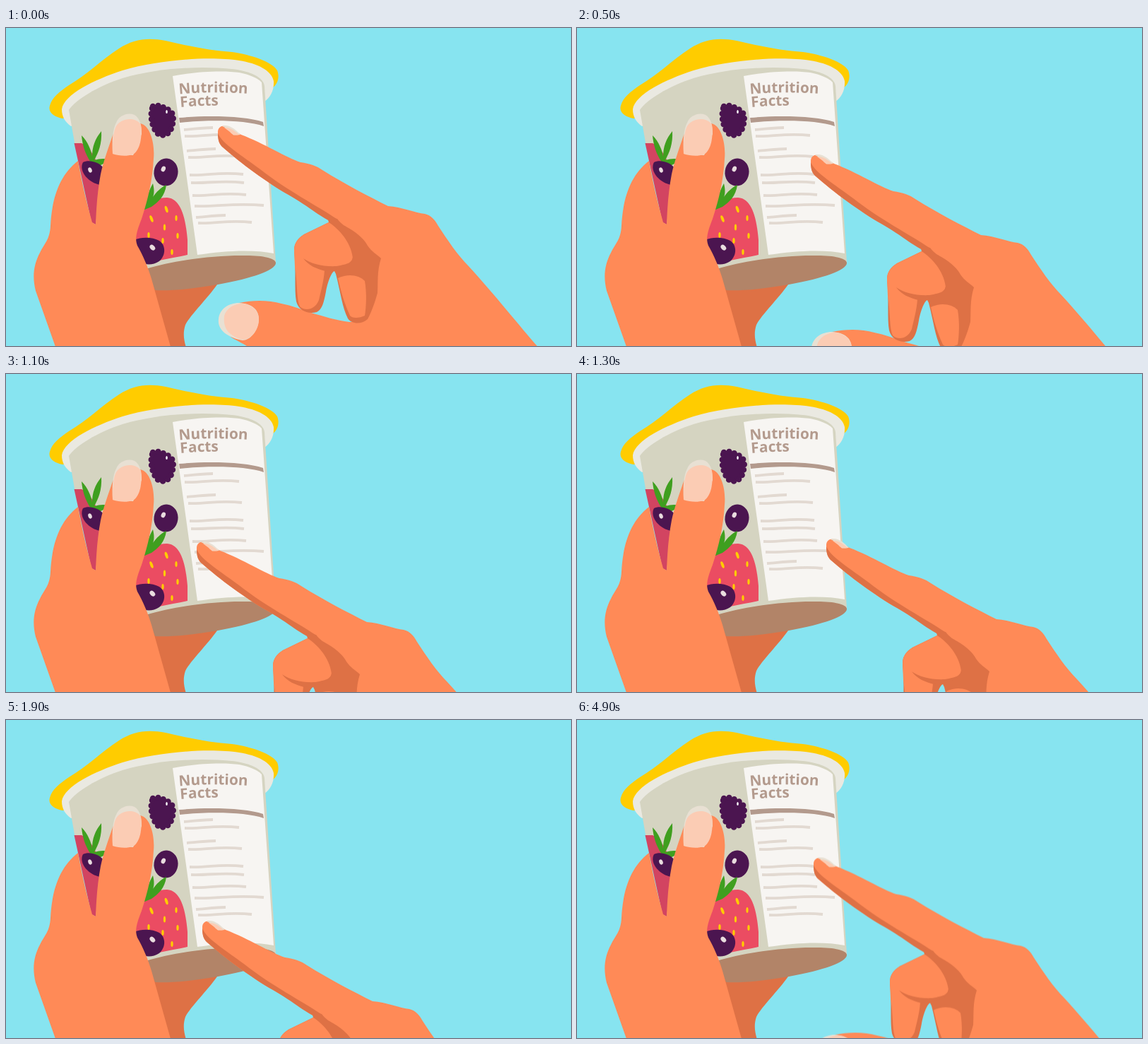
These frames come from a looping animation (800 by 450 pixels, 5 s). An HTML page:

```html
<!DOCTYPE html>
<html lang="en">
<head>
<meta charset="utf-8">
<title>Reading the label</title>
<style>
html, body { margin: 0; width: 100%; height: 100%; overflow: hidden; background: #87e4f0; }
svg { display: block; width: 100%; height: 100%; }
.skin { fill: #ff8a57; }
.shade { fill: #de7145; }
.pink { fill: #fbccb4; }
.edge { fill: #e8e0d3; }
.body { fill: #d5d4c1; }
.rim { fill: #eae9e1; }
.gold { fill: #ffcc00; }
.plum { fill: #4b1550; }
.leaf { fill: #3f9f1f; }
.shine { fill: #e9dcdf; }
.paper { fill: #f7f5f2; }
.taupe { fill: #b39a8d; }
.lines { fill: none; stroke: #e2d9d1; stroke-width: 3.8; }
.title { font: 700 20.8px "Open Sans", "Noto Sans", sans-serif; fill: #b39a8d; }
/* Ten poses per second: lift to the line start, sweep to its end, rest. */
#pointer { animation: read 5s step-end infinite; }
@keyframes read {
  0% { transform: translate(0, 0); }
  4% { transform: translate(-20px, 22px); }
  6% { transform: translate(-39.5px, 44.5px); }
  8% { transform: translate(-4px, 43px); }
  10% { transform: translate(31px, 41px); }
  20% { transform: translate(2px, 70px); }
  22% { transform: translate(-30px, 99px); }
  24% { transform: translate(12px, 97px); }
  26% { transform: translate(53px, 95px); }
  36% { transform: translate(26.5px, 124.5px); }
  38% { transform: translate(-22px, 146px); }
  40% { transform: translate(21px, 143px); }
  42% { transform: translate(63px, 140px); }
  98% { transform: translate(35px, 56.5px); }
  100% { transform: translate(0, 0); }
}
</style>
</head>
<body>
<svg viewBox="0 0 800 450">
  <defs>
    <path id="row1" d="M245 93.5Q294 89 350 93.5"/>
    <path id="row2" d="M247 112Q275 109.5 312 109.5"/>
  </defs>
  <rect width="800" height="450" fill="#87e4f0"/>

  <!-- palm behind the cup -->
  <path class="shade" d="M200 345L303 357L299 363C285 383 262 405 254 420C250 432 252 442 255 452H225Z"/>

  <!-- lid and rim -->
  <path class="gold" d="M80 128C69 126 59 120 62 110C65 98 76 90 89 81C115 66 135 45 160 29C180 16 200 13 226 18C260 26 290 32 320 34C348 38 377 48 384 60C388 70 384 80 378 84L300 90L100 125Z"/>
  <path class="rim" d="M79 115C82 94 125 73 165 60C220 44 290 40 330 46C356 50 376 60 379 75C380 88 374 99 366 104L350 90L110 130L92 139C84 133 79 126 79 115Z"/>

  <!-- cup -->
  <path class="body" d="M89 116C98 102 130 82 165 71C220 55 280 54 320 58C345 61 364 69 366 82L382 332L200 345L122 278L97 162Z"/>
  <path fill="#b28468" d="M198 341C240 328 300 321 340 322C365 322 381 326 382 332C383 342 350 354 300 363C260 370 230 372 211 371Z"/>
  <path class="paper" d="M236 68C270 61 310 60 330 63C345 66 357 71 362 77L379 319C350 313 310 315 271 321Z"/>
  <text class="title"><textPath href="#row1">Nutrition</textPath></text>
  <text class="title"><textPath href="#row2">Facts</textPath></text>
  <path class="taupe" d="M245 127C290 123 340 125 364 133L365 139C340 130.500 290 129.500 246 134Z"/>
  <path class="lines" d="M252 144c14 -1 28 -3 41 -3M253 153c28 1 42 -5 77 -1M256 174c14 -1 28 -3 41 -3M258 183c28 1 42 -5 76 -1M260 208c28 1 42 -5 76 -1M262 219c28 1 42 -4 75 0M264 237c28 1 42 -5 76 -1M267 252c36 1 55 -5 98 -1M269 268c14 -1 28 -3 42 -3M272 276c28 1 42 -5 76 -1"/>

  <!-- fruit -->
  <path fill="#d24461" d="M96.500 163L107 163C120 169 131 190 135 212L127 278L121 275Z"/>
  <path class="leaf" d="M120 190C112 178 108 165 107 152C116 161 121 174 122 182C122 168 126 157 135 146C136 164 131 176 125 187C132 185 138 184 146 186C138 193 130 197 123 196Z"/>
  <path class="plum" d="M109 190C117 186 131 189 138 198L134 222C118 220 102 203 109 190Z"/>
  <ellipse class="shine" cx="119" cy="201" rx="2.6" ry="3.8" transform="rotate(-20 119 201)"/>

  <path class="plum" d="M208 111C216 108 223 112 232 117C239 122 237 134 234 142C231 150 224 153 217 151C209 146 202 126 208 111Z" stroke="#4b1550" stroke-width="8.500" stroke-linecap="round" stroke-dasharray="0 7.600"/>
  <ellipse fill="#fff" cx="227.500" cy="118.500" rx="1.300" ry="2.600"/>
  <ellipse class="plum" cx="226.500" cy="204" rx="17" ry="19.500" transform="rotate(8 226 204)"/>
  <ellipse class="shine" cx="223" cy="199.500" rx="3" ry="4" transform="rotate(25 223 199)"/>

  <path fill="#eb4c62" d="M172 310L189 263C199 248 212 240 228 240C246 241 254 264 257 300L257 321C245 324 230 326 217 329Z"/>
  <path class="leaf" d="M194 258C198 244 202 230 208 220C210 228 210 234 208 239C213 232 219 226 227 222C225 238 216 246 206 253Z"/>
  <g class="gold">
    <ellipse cx="227" cy="256.500" rx="2" ry="5" transform="rotate(-18 227 256)"/>
    <ellipse cx="206" cy="270" rx="2" ry="5" transform="rotate(-22 206 270)"/>
    <ellipse cx="241" cy="269" rx="1.600" ry="4"/>
    <ellipse cx="224.500" cy="282" rx="1.700" ry="4.500"/>
    <ellipse cx="243" cy="294" rx="1.700" ry="4"/>
    <ellipse cx="202" cy="293" rx="1.700" ry="4"/>
    <ellipse cx="222" cy="301" rx="1.700" ry="4"/>
    <ellipse cx="235" cy="317" rx="1.700" ry="4"/>
  </g>
  <path class="plum" d="M182 300C192 295 208 296 217 301C227 308 226 322 217 330C208 336 198 335 190 332Z"/>
  <ellipse class="shine" cx="207.500" cy="311" rx="3.200" ry="4.400" transform="rotate(-45 207 311)"/>

  <!-- holding hand -->
  <path class="skin" d="M70 451L42 372C37 352 39 335 48 318C54 305 62 300 63 280C65 240 76 208 102 188C108 222 115 250 122 275L127 278C128 250 130 228 134 207C138 188 145 170 151 152C156 140 170 133 190 135C205 138 211 165 209 185C207 220 200 245 192 270C185 288 182 298 186 308C194 322 201 338 206 355L233 451Z"/>
  <path class="edge" d="M151 178C150 160 151 143 156 134C160 124 172 119 182 123C190 128 192 138 192 150L180 180Z"/>
  <path class="pink" d="M151 178C151 160 152 148 155 141C161 127 184 125 191 137C193 155 190 172 180 179C170 182 160 181 151 178Z"/>

  <!-- pointing hand -->
  <g id="pointer">
    <path class="skin" d="M300 147C300 140 306 137 313 139L333 151C365 163 398 184 417 190C430 192 440 195 448 201C480 221 515 239 541 252C560 253 580 262 593 263C602 265 607 271 612 280C625 300 640 322 655 337C690 375 730 425 752 450L760 460H352C346 450 330 445 318 437L330 389C350 385 372 385 390 390C405 393 418 398 432 403C450 408 468 414 486 416L505 415V326L465 275C450 267 430 253 400 236C370 219 332 191 306 168C301 163 300 155 300 147Z"/>
    <path class="shade" d="M300 149C306 164 335 181 360 200C398 230 440 251 468 270L470 278C450 272 430 253 400 236C370 219 332 191 306 168C301 163 300 157 300 149Z"/>
    <path class="shade" d="M455 268L469 270C475 278 480 280 485 283C500 292 508 300 512 308C518 317 525 320 531 326C525 345 527 360 526 375C522 390 516 405 512 412C503 420 489 419 484 411C476 395 474 375 467 348L465 344C460 346 455 362 453 373C450 388 448 398 440 402C428 405 415 401 411 387C408 370 411 345 408 315C408 304 413 298 422 292L457 275Z"/>
    <path class="skin" d="M408 315C408 304 413 298 422 292L457 275C471 284 488 302 491 325C490 335 472 340 451 343C450 358 446 372 443 385C438 398 425 401 417 395C411 388 413 360 409 338Z"/>
    <path class="shade" d="M421 326C432 334 450 338 468 337C485 334 491 332 491 322C495 335 480 341 452 344C440 341 428 336 421 326Z"/>
    <path class="skin" d="M470 354C485 347 500 350 508 358C511 375 510 395 508 407C500 411 490 411 487 407C479 390 474 372 470 354Z"/>
    <path class="edge" d="M306 139C314 135 325 143 332 151L322 151.500C317 146 312 141 306 139Z"/>
    <path class="pink" d="M309 141C317 140 325 146 330 151C325 152.500 320 151 317 147Z"/>
    <path class="edge" d="M301 412C302 398 315 389 330 389C348 390 358 398 358 412C357 430 345 442 335 442C315 438 299 428 301 412Z"/>
    <path class="pink" d="M309 408C311 398 322 390 335 390C350 392 359 402 358 414C357 430 345 441 335 441C315 436 307 424 309 408Z"/>
  </g>
</svg>
</body>
</html>
```
